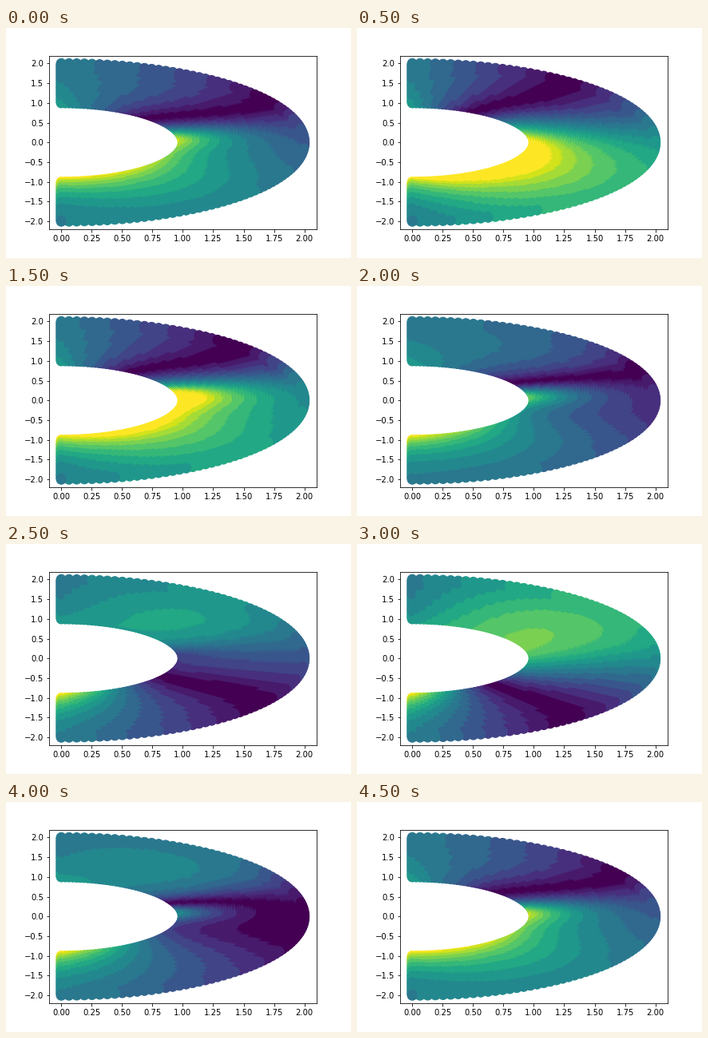
Recreate the animation shown at these times as a matplotlib script. Size 432 by 288 pixels, loop 5 s.

```python
import numpy as np
import matplotlib.pyplot as plt
from matplotlib.animation import FuncAnimation

plt.rcParams.update({"font.family": "DejaVu Sans", "font.size": 10})

N_R, N_ANGLE = 50, 100
FRAMES, STEP_MS = 10, 500
PERIOD = FRAMES - 1          # the last step closes the cycle

# Shells drawn from the inside out, each from the top pole to the bottom one
depth, polar = np.meshgrid(np.linspace(0, 1, N_R),
                           np.linspace(0, np.pi, N_ANGLE), indexing="ij")
R = 1 + depth
lat = np.pi / 2 - polar


def background():
    """Steady part: negative at the top pole, positive at the bottom."""
    top = -0.40 - 0.15 * np.exp(-2.2 * depth)
    bottom = 0.38 + 0.60 * np.exp(-2.4 * depth)
    bend = 0.03 + 0.08 * np.sin(2.4 * depth)
    return (top + (bottom - top) * polar / np.pi
            - bend * np.sin(2 * lat) + 0.03 * depth * np.cos(lat))


def swell():
    """Broad mode that vanishes at both poles."""
    skew = 1 - 0.2 * np.exp(-3 * depth) * np.sin(lat)
    return (0.48 + 0.42 * np.exp(-1.8 * depth)) * skew * np.cos(lat)


def plume():
    """Narrow tongue leaving the inner shell near the equator."""
    offset = np.degrees(lat) - 6 - 6 * depth
    return np.exp(-1.3 * depth - (offset / 20) ** 2)


BACKGROUND, SWELL, PLUME = background(), swell(), plume()


def field(step):
    phase = 2 * np.pi / PERIOD
    swing = np.cos(phase * (step - 1.75))
    pulse = 0.30 + 0.33 * np.cos(2 * phase * (step - 8.1))
    return np.abs(BACKGROUND + swing * SWELL + pulse * PLUME).ravel()


fig = plt.figure(figsize=(6, 4), dpi=72)
fig.subplots_adjust(left=0.125, right=0.9, bottom=0.125, top=0.88)
ax = fig.add_subplot()
dots = ax.scatter((R * np.sin(polar)).ravel(), (R * np.cos(polar)).ravel(),
                  s=150, c=field(0), cmap=plt.get_cmap("viridis", 16),
                  vmin=0, vmax=1)


def update(i):
    dots.set_array(field(i % PERIOD))
    return dots,


anim = FuncAnimation(fig, update, frames=FRAMES, interval=STEP_MS, repeat=True)
plt.show()
```
